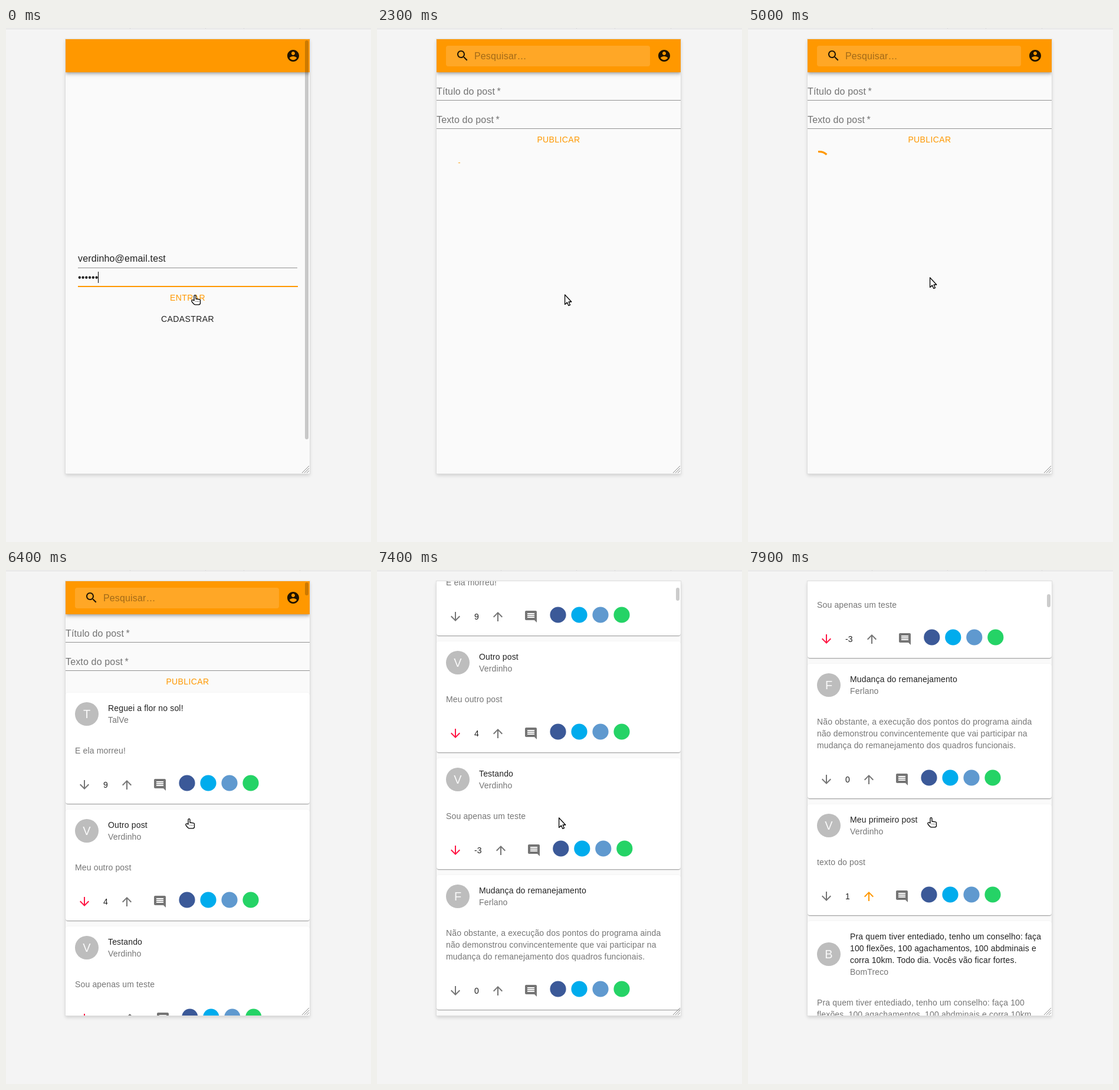
Write an HTML page that moves like this. It is 619x871 px and loops after 8 s.

```html
<!DOCTYPE html>
<html lang="pt">
<head>
<meta charset="utf-8">
<style>
html, body { margin: 0; width: 100%; height: 100%; overflow: hidden; background: #f4f4f4; }
body { position: relative; font: 14px/20px "Liberation Sans", Arial, sans-serif; letter-spacing: .01071em; color: rgba(0,0,0,.87); }
div, svg { position: absolute; white-space: pre; }
svg { overflow: visible; left: 0; top: 0; }
.big { font-size: 16px; line-height: 19px; letter-spacing: .00938em; }
.soft { color: rgba(0,0,0,.54); }
.btn { left: 122px; width: 372px; text-align: center; letter-spacing: .02857em; }
.orange { color: #ff9800; }
.off .btn { color: rgba(0,0,0,.26); }
#phone { left: 101px; top: 19px; width: 414px; height: 736px; background: #fafafa; overflow: hidden; }
#frame { left: 101px; top: 19px; width: 414px; height: 736px; box-shadow: 0 0 0 1px #dedede, 0 3px 6px rgba(0,0,0,.16); }
#page { left: -101px; top: -19px; width: 619px; height: 871px; }
#login, #feed, #posts { left: 0; top: 0; width: 619px; }
#bar { left: 101px; top: 19px; width: 414px; height: 56px; background: #ff9800;
  box-shadow: 0 2px 4px -1px rgba(0,0,0,.2), 0 4px 5px rgba(0,0,0,.14), 0 1px 10px rgba(0,0,0,.12); }
.card { left: 101px; width: 414px; background: #fff; border-radius: 4px;
  box-shadow: 0 2px 1px -1px rgba(0,0,0,.2), 0 1px 1px rgba(0,0,0,.14), 0 1px 3px rgba(0,0,0,.12); }
.avatar { left: 16px; width: 40px; height: 40px; border-radius: 50%; background: #bdbdbd; color: #fafafa;
  font-size: 20px; line-height: 40px; letter-spacing: 0; text-align: center; }
#thumb { left: 507px; width: 6px; border-radius: 3px; background: rgba(0,0,0,.2); }
</style>
</head>
<body>
<div id="frame"></div>
<div id="phone"><div id="page"></div></div>
<div id="thumb"></div>
<svg width="619" height="871">
  <path d="M0 1.5H619M210.5 0v1M338.5 0v1M403.5 0v1M498.5 0v1" stroke="#dcdcdc"/>
  <path d="M502 754L514 742M506 754L514 746M510 754L514 750" stroke="#8c8c8c"/>
  <g id="cursor" stroke="#000" fill="#fff" stroke-linejoin="round">
    <path id="arrow" stroke-width="1.3" d="M.6 1V17.4L4.4 13.9L6.9 19.4L9.5 18.3L7.1 13H11.8Z"/>
    <g id="hand" transform="translate(-4 0)">
      <path stroke-width="1.3" d="M5 10V2.2C5 .2 8 .2 8 2.2V7L14 7.8Q15.5 8 15.5 9.5V14Q15.5 16.8 13 16.8H6.5C5 16.8 1 12 .8 10.6C.7 8.6 3 8.4 5 10Z"/>
      <path d="M7.5 11.5h1M10 11.5h1M12.5 11.5h1"/>
    </g>
  </g>
</svg>
<script>
const $ = id => document.getElementById(id);
const DARK = 'rgba(0,0,0,.87)', SOFT = 'rgba(0,0,0,.54)', RED = '#ff1744', ORANGE = '#ff9800';
const ICON = {
  search: 'M15.5 14h-.79l-.28-.27C15.41 12.59 16 11.11 16 9.5 16 5.91 13.09 3 9.5 3S3 5.91 3 9.5 5.91 16 9.5 16c1.61 0 3.09-.59 4.23-1.57l.27.28v.79l5 4.99L20.49 19l-4.99-5zm-6 0C7.01 14 5 11.99 5 9.5S7.01 5 9.5 5 14 7.01 14 9.5 11.99 14 9.5 14z',
  user: 'M12 2C6.48 2 2 6.48 2 12s4.48 10 10 10 10-4.48 10-10S17.52 2 12 2zm0 3c1.66 0 3 1.34 3 3s-1.34 3-3 3-3-1.34-3-3 1.34-3 3-3zm0 14.2c-2.5 0-4.71-1.28-6-3.22.03-1.99 4-3.08 6-3.08 1.99 0 5.97 1.09 6 3.08-1.29 1.94-3.5 3.22-6 3.22z',
  down: 'M20 12l-1.41-1.41L13 16.17V4h-2v12.17l-5.58-5.59L4 12l8 8 8-8z',
  up: 'M4 12l1.41 1.41L11 7.83V20h2V7.83l5.58 5.59L20 12l-8-8-8 8z',
  note: 'M21.99 4c0-1.1-.89-2-1.99-2H4c-1.1 0-2 .9-2 2v12c0 1.1.9 2 2 2h14l4 4-.01-18zM18 14H6v-2h12v2zm0-3H6V9h12v2zm0-3H6V6h12v2z'
};
// text by left edge and baseline; icon by centre
const text = (x, base, s, cls = '') => `<div class="${cls}" style="left:${x}px;top:${base - 15}px">${s}</div>`;
const button = (base, s, cls = '') => `<div class="btn ${cls}" style="top:${base - 15}px">${s}</div>`;
const box = (x, y, w, h, css, id = '') => `<div id="${id}" style="left:${x}px;top:${y}px;width:${w}px;height:${h}px;${css}"></div>`;
const line = (x, y, w) => box(x, y, w, 1, 'background:rgba(0,0,0,.42)');
const icon = (name, cx, cy, fill = DARK) =>
  `<svg style="left:${cx - 12}px;top:${cy - 12}px" width="24" height="24"><path d="${ICON[name]}" fill="${fill}"/></svg>`;

const posts = [
  ['TalVe', ['Reguei a flor no sol!'], ['E ela morreu!'], '9'],
  ['Verdinho', ['Outro post'], ['Meu outro post'], '4', 'down'],
  ['Verdinho', ['Testando'], ['Sou apenas um teste'], '-3', 'down'],
  ['Ferlano', ['Mudança do remanejamento'], ['Não obstante, a execução dos pontos do programa ainda',
    'não demonstrou convincentemente que vai participar na', 'mudança do remanejamento dos quadros funcionais.'], '0'],
  ['Verdinho', ['Meu primeiro post'], ['texto do post'], '1', 'up'],
  ['BomTreco', ['Pra quem tiver entediado, tenho um conselho: faça', '100 flexões, 100 agachamentos, 100 abdminais e',
    'corra 10km. Todo dia. Vocês vão ficar fortes.'], ['Pra quem tiver entediado, tenho um conselho: faça 100',
    'flexões, 100 agachamentos, 100 abdminais e corra 10km.', 'Todo dia. Vocês vão ficar fortes.'], '0']
];
const spots = []; // vertical ranges where the pointer becomes a hand
let nextTop = 208;

function card([name, title, body, votes, voted]) {
  const extra = 20 * (title.length - 1);
  const h = 188 + extra + 20 * (body.length - 1);
  const shift = 4.8 * (votes.length - 1), row = h - 32;
  const circles = ['#3b5998', '#00aced', '#5f99cf', '#25d366'].map((c, i) =>
    `<circle cx="${206 + shift + 36 * i}" cy="${h - 35}" r="13.6" fill="${c}"/>`).join('');
  const html = `<div class="card" style="top:${nextTop}px;height:${h}px">` +
    `<div class="avatar" style="top:${16 + extra / 2}px">${name[0]}</div>` +
    text(72, 31, title.join('\n')) + text(72, 51 + extra, name, 'soft') +
    text(16, 103 + extra, body.join('\n'), 'soft') +
    icon('down', 32, row, voted == 'down' ? RED : SOFT) + text(64, h - 27, votes) +
    icon('up', 104 + shift, row, voted == 'up' ? ORANGE : SOFT) + icon('note', 160 + shift, row, SOFT) +
    `<svg>${circles}</svg></div>`;
  spots.push([nextTop, nextTop + 72 + extra], [nextTop + h - 49, nextTop + h - 21]);
  nextTop += h + 10;
  return html;
}

$('page').innerHTML = `<div id="bar"></div>` +
  `<div id="login">` +
    text(122, 396, 'verdinho@email.test', 'big') + line(122, 406, 372) +
    text(122, 428, '••••••', 'big') + box(156, 413, 1, 19, 'background:#000', 'caret') +
    line(122, 438, 372) + box(122, 437, 373, 2, 'background:' + ORANGE, 'focus') +
    `<div style="left:122px;top:439px;width:372px;height:36px;overflow:hidden;border-radius:4px">` +
      box(0, -180, 392, 392, 'border-radius:50%;background:' + ORANGE, 'ripple') + `</div>` +
    button(462, 'ENTRAR', 'orange') + button(498, 'CADASTRAR') + `</div>` +
  `<div id="feed">` +
    box(117, 30, 346, 35, 'border-radius:4px;background:rgba(255,255,255,.15)') + icon('search', 145, 47) +
    text(165, 53, '<span style="opacity:.42">Pesquisar…</span>', 'big') +
    text(101, 113, 'Título do post\u2009*', 'big soft') + line(101, 122, 414) +
    text(101, 161, 'Texto do post\u2009*', 'big soft') + line(101, 170, 414) +
    button(194, 'PUBLICAR', 'orange') +
    `<svg id="spinner" style="left:101px;top:208px" width="40" height="40" viewBox="22 22 44 44">` +
      `<circle id="arc" cx="44" cy="44" r="20.2" fill="none" stroke="${ORANGE}" stroke-width="3.6"/></svg>` +
    `<div id="posts">${posts.map(card).join('')}</div></div>` +
  icon('user', 487, 47);

const clamp = v => Math.max(0, Math.min(1, v));
const mix = (a, b, p) => a + (b - a) * p;
const show = (id, on) => $(id).style.display = on ? '' : 'none';

// cubic-bezier(.42, 0, .58, 1)
function easeInOut(x) {
  let lo = 0, hi = 1, s;
  for (let i = 0; i < 20; i++) {
    s = (lo + hi) / 2;
    if (1.26 * (1 - s) ** 2 * s + 1.74 * (1 - s) * s * s + s ** 3 < x) lo = s; else hi = s;
  }
  return s * s * (3 - 2 * s);
}

const path = [[0, 318, 452], [100, 318, 451], [4000, 318, 451], [4100, 318, 453], [4200, 317, 447], [4300, 314, 437],
  [4600, 308, 422], [5800, 308, 422], [5900, 308, 421], [6900, 308, 421], [7100, 308, 419], [8000, 308, 419]];

function pointer(t) {
  const i = path.findIndex(k => k[0] > t);
  const [a, b] = [path[i - 1], path[i]];
  const p = (t - a[0]) / (b[0] - a[0]);
  return [Math.round(mix(a[1], b[1], p)), Math.round(mix(a[2], b[2], p))];
}

function spin(t) {
  const c = (Math.max(0, t - 2385) % 1400) / 1400;
  const e = easeInOut(c * 2 % 1);
  const first = c < .5;
  $('arc').style.strokeDasharray = `${first ? mix(1, 100, e) : 100} 200`;
  $('arc').style.strokeDashoffset = first ? -15 * e : mix(-15, -125, e);
  $('arc').setAttribute('transform', `rotate(${c * 360} 44 44)`);
}

function draw(t) {
  const login = t < 2300, loaded = t >= 5900, pressed = t >= 300;
  show('login', login);
  show('feed', !login);
  show('spinner', !loaded);
  show('posts', loaded);

  show('caret', !pressed);
  $('login').className = pressed ? 'off' : '';
  $('focus').style.transform = `scaleX(${(1 - clamp((t - 250) / 200)) ** 2})`;
  const r = clamp((t - 200) / 550);
  $('ripple').style.transform = `scale(${easeInOut(r)})`;
  $('ripple').style.opacity = pressed ? .3 * (1 - clamp((t - 300) / 500)) : 0;

  spin(t);

  const u = Math.max(0, (t - 6900) / 100);
  const scroll = Math.round(u * (49.7 + 1.46 * u));
  $('page').style.transform = `translateY(${-scroll}px)`;
  show('thumb', login || loaded);
  $('thumb').style.top = 21 + scroll * .0313 + 'px';
  $('thumb').style.height = (login ? 676 : 22) + 'px';

  const [x, y] = pointer(t);
  const hover = loaded ? spots.some(([a, b]) => y + scroll >= a && y + scroll < b) : !pressed;
  $('cursor').setAttribute('transform', `translate(${x} ${y})`);
  show('hand', hover);
  show('arrow', !hover);
}

const start = performance.now();
function tick() {
  const t = (performance.now() - start) % 8000;
  draw(Math.floor(t / 100) * 100);
  requestAnimationFrame(tick);
}
tick();
</script>
</body>
</html>
```
